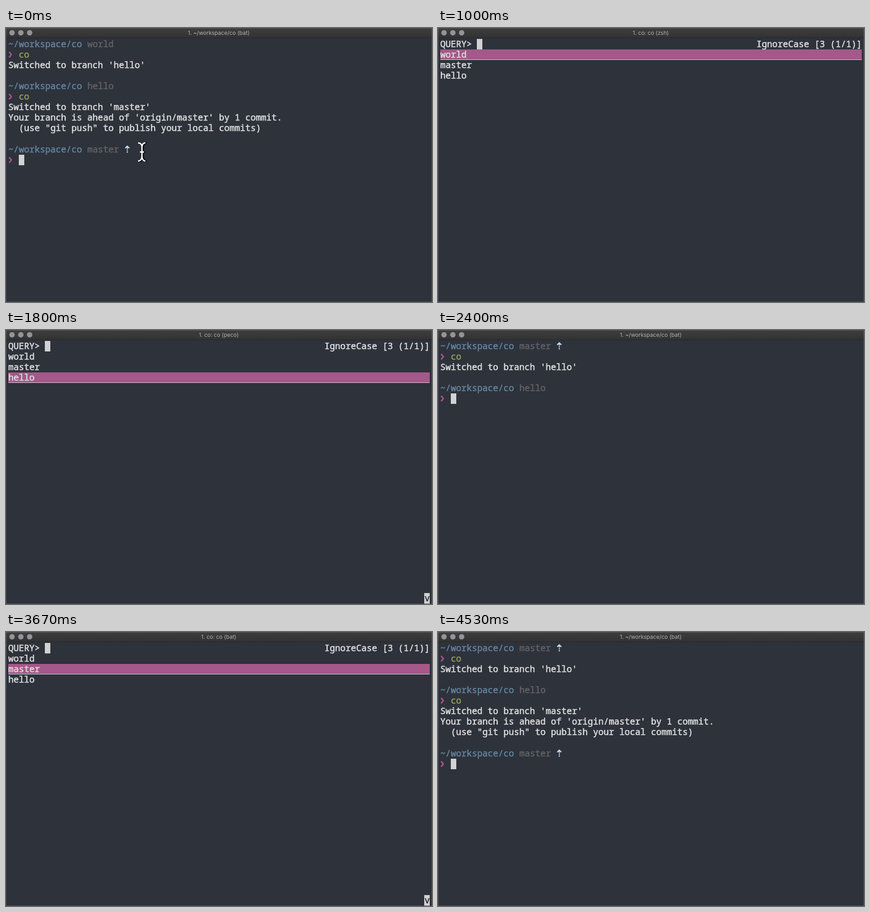
Recreate the animation shown at these times as an HTML page with a canvas. Size 932 by 601 pixels, loop 4.59 s.

```html
<!DOCTYPE html>
<html lang="en">
<head>
<meta charset="utf-8">
<title>Branch switcher</title>
<style>
  html, body { margin: 0; width: 100%; height: 100%; overflow: hidden; background: #2e323b; }
  canvas { display: block; }
</style>
</head>
<body>
<canvas id="stage" width="932" height="601"></canvas>
<script>
const ctx = document.getElementById('stage').getContext('2d');
const LOOP = 4590, CELL = 11.53, ROW = 23.05, LEFT = 5, TOP = 24, COLS = 80;
const COLOR = {
  back: '#2e323b', text: '#d9d9d9', path: '#61809a', dim: '#5e6064', ok: '#8e9b57',
  error: '#b05252', mark: '#b0528f', bar: '#a5588a', ahead: '#c3e2ff', cursor: '#d2d2d2'
};

// A line is a list of [column, text, color] runs.
const plain = text => [[0, text, COLOR.text]];
const path = (branch, ahead) => [
  [0, '~/workspace/co', COLOR.path],
  [15, branch, COLOR.dim],
  ...(ahead ? [[16 + branch.length, '⇡', COLOR.ahead]] : [])
];
const input = (text = '', color = COLOR.ok) => [[0, '❯', COLOR.mark], [2, text, color]];

const toHello = plain("Switched to branch 'hello'");
const toMaster = plain("Switched to branch 'master'");
const status = [
  plain("Your branch is ahead of 'origin/master' by 1 commit."),
  plain('  (use "git push" to publish your local commits)')
];
const master = path('master', true), hello = path('hello');
const afterHello = [master, input('co'), toHello, []];
const afterMaster = [...afterHello, hello, input('co'), toMaster, ...status, []];

const home = app => `1. ~/workspace/co (${app})`;
const running = app => `1. co: co (${app})`;
const shell = (title, lines, col, row = lines.length - 1) => ({ title, lines, col, row });
const menu = (title, selected, moved) => ({
  title, selected, moved, col: 7, row: 0,
  lines: [
    [[0, 'QUERY>', COLOR.text], [60, 'IgnoreCase [3 (1/1)]', COLOR.text]],
    ...['world', 'master', 'hello'].map(plain)
  ]
});

const opening = shell(home('bat'), [
  path('world'), input('co'), toHello, [],
  hello, input('co'), toMaster, ...status, [],
  master, input()
], 2);

const scenes = [
  [0, { ...opening, pointer: true }],
  [70, opening],
  [130, shell(home('bat'), [master, input()], 2)],
  [400, shell(home('bat'), [master, input('c', COLOR.text)], 3)],
  [470, shell(home('bat'), [master, input('c', COLOR.error)], 3)],
  [530, shell(home('bat'), [master, input('co')], 4)],
  [930, shell(running('zsh'), [], COLS - 1, 24)],
  [1000, menu(running('zsh'), 1)],
  [1600, menu(running('zsh'), 2, true)],
  [1670, menu(running('peco'), 2, true)],
  [1730, menu(running('peco'), 3, true)],
  [1870, shell(running('peco'), [master, input('co'), []], 0)],
  [1930, shell(running('peco'), afterHello, 0)],
  [2000, shell(home('peco'), afterHello, 0)],
  [2070, shell(home('peco'), [...afterHello, master, input()], 2)],
  [2130, shell(home('peco'), [...afterHello, hello, input()], 2)],
  [2400, shell(home('bat'), [...afterHello, hello, input()], 2)],
  [2600, shell(home('bat'), [...afterHello, hello, input('c', COLOR.text)], 3)],
  [2670, shell(home('bat'), [...afterHello, hello, input('c', COLOR.error)], 3)],
  [2730, shell(home('bat'), [...afterHello, hello, input('co')], 4)],
  [2870, shell(running('bat'), [...afterHello, hello, input('co')], 4)],
  [2930, shell(running('bat'), [], 0, 0)],
  [3000, menu(running('bat'), 1)],
  [3670, menu(running('bat'), 2, true)],
  [3870, shell(running('bat'), [...afterHello, hello, input('co'), []], 0)],
  [3930, shell(running('bat'), [...afterHello, hello, input('co'), toMaster, []], 0)],
  [4000, shell(home('bat'), afterMaster, 0)],
  [4070, shell(home('bat'), [...afterMaster, hello, input()], 2)],
  [4130, shell(home('bat'), [...afterMaster, master, input()], 2)]
];

const cellX = col => LEFT + col * CELL;
const rowY = row => Math.round(TOP + row * ROW);

function rect(x, y, w, h, color) {
  ctx.fillStyle = color;
  ctx.fillRect(x, y, w, h);
}

function stroke(shape, color, width) {
  ctx.strokeStyle = color;
  ctx.lineWidth = width;
  ctx.stroke(new Path2D(shape));
}

function drawBlock(col, row) {
  rect(Math.floor(cellX(col)), rowY(row), 12, 23, COLOR.cursor);
}

// Prompt symbols are drawn as strokes so they do not depend on font coverage.
const symbols = {
  '❯': color => stroke('M1.8 5.5 L6.8 11.5 L1.8 17.5', color, 2.9),
  '⇡': color => {
    stroke('M2.2 8.6 L6.7 4 L11.2 8.6', color, 2.3);
    stroke('M6.7 4 V10 M6.7 11.5 V14 M6.7 15.5 V18.5', color, 2.4);
  }
};

function drawRun(row, [col, text, color]) {
  const x = cellX(col), y = rowY(row);
  if (symbols[text]) {
    ctx.save();
    ctx.translate(x, y);
    symbols[text](color);
    ctx.restore();
  } else {
    // A thin outline gives the medium weight of the terminal face.
    ctx.fillStyle = ctx.strokeStyle = color;
    ctx.lineWidth = 0.7;
    ctx.fillText(text, x, y + 18);
    ctx.strokeText(text, x, y + 18);
  }
}

function drawWindow(title) {
  rect(0, 0, 932, 601, COLOR.back);
  const shade = ctx.createLinearGradient(0, 0, 0, 22);
  shade.addColorStop(0, '#3e3e3f');
  shade.addColorStop(1, '#323233');
  rect(0, 0, 932, 22, shade);
  rect(0, 21, 932, 1, '#25272b');
  ctx.strokeStyle = 'rgba(255,255,255,.16)';
  ctx.lineWidth = 1;
  ctx.strokeRect(0.5, 0.5, 931, 600);
  ctx.fillStyle = '#949399';
  for (const x of [13.2, 32.5, 51.7]) {
    ctx.beginPath();
    ctx.arc(x, 10.5, 5.9, 0, 2 * Math.PI);
    ctx.fill();
  }
  ctx.font = '12px Inter, sans-serif';
  ctx.textAlign = 'center';
  ctx.fillStyle = '#b3b3b3';
  ctx.fillText(title, 465.5, 15);
}

function drawPointer() {
  const beam = 'M289 252 Q297 252 297.5 261 V282 Q297 291 289 292 M305 252 Q298 252 297.5 261 M297.5 282 Q298 291 305 292 M293 272 H302';
  ctx.save();
  ctx.translate(2.5, 0.5);
  stroke(beam, '#08090b', 4);
  ctx.restore();
  stroke(beam, '#fff', 2.8);
}

function drawScene({ title, lines, col, row, selected, moved, pointer }) {
  drawWindow(title);
  if (selected) {
    const y = rowY(selected);
    rect(LEFT, y, 922, 23, COLOR.bar);
    rect(LEFT, y + 22, 922, 1, '#dedede');
  }
  drawBlock(col, row);
  ctx.font = '500 19.22px "Noto Sans Mono", monospace';
  ctx.textAlign = 'left';
  lines.forEach((line, i) => line.forEach(run => drawRun(i, run)));
  if (moved) {
    drawBlock(COLS - 1, 24);
    drawRun(24, [COLS - 1, 'v', COLOR.back]);
  }
  if (pointer) drawPointer();
}

ctx.lineJoin = 'round';
const start = performance.now();
function tick() {
  const time = (performance.now() - start) % LOOP;
  drawScene(scenes.findLast(([from]) => from <= time)[1]);
  requestAnimationFrame(tick);
}
tick();
</script>
</body>
</html>
```
